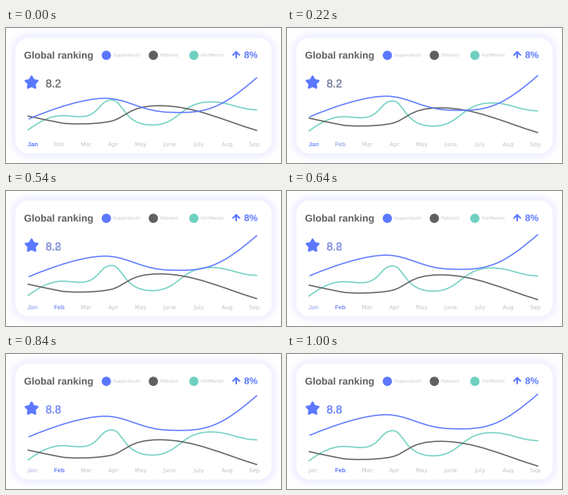
Animation of 344x169 px, one loop 2.02 s. Source, as a matplotlib script:

```python
import numpy as np
import matplotlib.pyplot as plt
from matplotlib.animation import FuncAnimation
from matplotlib.patches import Circle, PathPatch, Polygon
from matplotlib.path import Path
from matplotlib.textpath import TextPath
from matplotlib.transforms import Affine2D

W, H, DPI = 344, 169, 64
STEP, FRAMES, MOVE = 20, 101, 50
PT = 72 / DPI
BLUE, DARK, TEAL, PALE = "#5b78ff", "#606060", "#6fd0c1", "#c3c3cd"

fig = plt.figure(figsize=(W / DPI, H / DPI), dpi=DPI, facecolor="white")
ax = fig.add_axes([0, 0, 1, 1])
ax.set_xlim(0, W)
ax.set_ylim(H, 0)
ax.axis("off")


def card():
    """White rounded card with a soft lavender glow."""
    y, x = np.mgrid[0:H, 0:W] + 0.5

    def distance(cx, cy, hw, hh, r):
        dx, dy = np.abs(x - cx) - hw + r, np.abs(y - cy) - hh + r
        return (np.hypot(np.maximum(dx, 0), np.maximum(dy, 0))
                + np.minimum(np.maximum(dx, dy), 0) - r)

    d = distance(172, 84.5, 160.5, 72.5, 17)
    glow = np.exp(-(np.maximum(d, 0) / 6.5) ** 2)
    glow *= np.clip(d + 0.5, 0, 1)
    tint = 1 - np.array([0.945, 0.949, 1.0])
    ax.imshow(1 - glow[..., None] * tint, extent=(0, W, H, 0),
              interpolation="nearest", aspect="auto", zorder=0)


def text(x, y, s, size, color, weight="normal", family="Liberation Sans", extra=0):
    path = TextPath((0, 0), s, size=size, prop={"family": family, "weight": weight})
    flip = Affine2D().scale(1, -1).translate(x, y)
    return ax.add_patch(PathPatch(path, fc=color, ec=color, lw=extra * PT,
                                  transform=flip + ax.transData, zorder=4))


def curve(points, color, z):
    codes = [Path.MOVETO] + [Path.CURVE4] * (len(points) - 1)
    patch = PathPatch(Path(points, codes), fc="none", ec=color, lw=1.5 * PT,
                      capstyle="round", joinstyle="round", zorder=z)
    return ax.add_patch(patch)


def star(cx, cy, r):
    a = np.arange(10) * np.pi / 5 - np.pi / 2
    rad = np.where(np.arange(10) % 2, r * 0.53, r)
    pts = np.column_stack([cx + rad * np.cos(a), cy + rad * np.sin(a)])
    ax.add_patch(Polygon(pts, fc=BLUE, ec=BLUE, lw=2.4 * PT,
                         joinstyle="round", zorder=3))


card()
text(22.5, 38.3, "Global ranking", 12.4, DARK, "bold")

legend = [(125.5, BLUE, "Suppersleuth"), (184.3, DARK, "Palboard"),
          (235, TEAL, "VisitMentor")]
for x, color, name in legend:
    ax.add_patch(Circle((x, 34.2), 5.8, fc=color, ec="none", zorder=3))
    text(x + 8.6, 35.6, name, 5.1, PALE, family="DejaVu Sans")

for xs, ys in [((288, 288), (37.2, 30)), ((284, 288, 292), (33.8, 29.9, 33.8))]:
    ax.plot(xs, ys, color=BLUE, lw=2 * PT, solid_capstyle="round",
            solid_joinstyle="round", zorder=3)
text(297.8, 37.6, "8%", 11.8, BLUE, "bold")

star(32, 68.5, 7.9)
old_score = text(49.6, 74.2, "8.2", 13.9, DARK, extra=0.3)
new_score = text(49.6, 74.2, "8.8", 13.9, BLUE, extra=0.3)

months = {"Jan": 27, "Feb": 60, "Mar": 93.6, "Apr": 128, "May": 161, "June": 197,
          "July": 235, "Aug": 269.6, "Sep": 304}
labels = {m: text(x, 148, m, 7.1, PALE, family="DejaVu Sans")
          for m, x in months.items()}
jan = text(27, 148, "Jan", 7.5, BLUE, "bold")
feb = text(60, 148, "Feb", 7.5, BLUE, "bold")

teal = curve([(27.5, 127.7), (42, 117), (55, 110), (70, 109.7),
              (82, 109.5), (92, 113), (103, 109.5),
              (117, 105), (119, 90), (132, 90),
              (147, 90), (146, 121.5), (183, 121.5),
              (217, 121.5), (218, 92.5), (256, 92.5),
              (280, 92.5), (290, 102), (313.7, 102.4)], TEAL, 2.0)
dark = curve([(27.5, 110.2), (40, 113), (55, 116), (69, 118.8),
              (78, 120.6), (110, 121), (130, 117),
              (150, 113), (152, 97.3), (192, 97.3),
              (235, 97.3), (270, 115), (313.7, 128.3)], DARK, 2.1)
blue = curve([(28.7, 113.7), (60, 100.5), (98, 88), (124, 88),
              (152, 88), (170, 105.3), (206, 105.5),
              (249, 107.2), (268, 102), (313.6, 62.3)], BLUE, 2.2)
travel = [(teal, 6), (dark, 12), (blue, -12)]


def draw(i):
    p = min(i / MOVE, 1)
    for line, dy in travel:
        line.set_transform(Affine2D().translate(0, dy * p) + ax.transData)
    for fading in (old_score, jan, labels["Feb"]):
        fading.set_alpha(1 - p)
    for rising in (new_score, labels["Jan"]):
        rising.set_alpha(p)
    feb.set_alpha(p ** 0.6)
    return []


anim = FuncAnimation(fig, draw, frames=FRAMES, init_func=lambda: draw(0),
                     interval=STEP, repeat=True, repeat_delay=0, blit=False)
plt.show()
```
